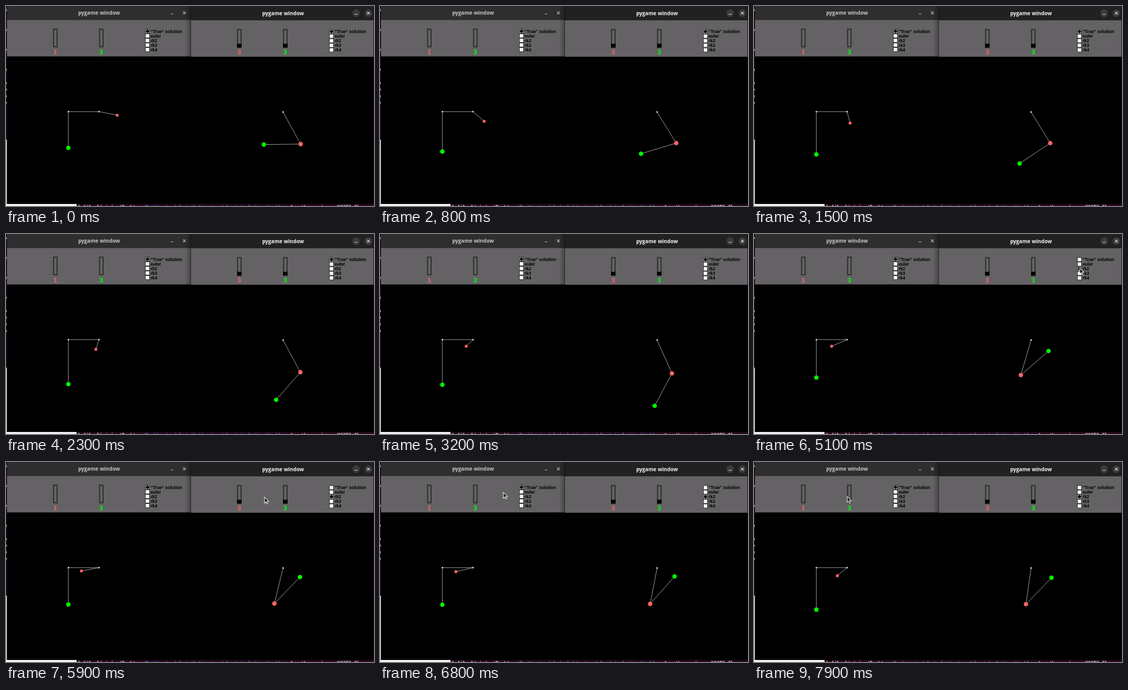
These frames come from a looping animation (720 by 392 pixels, 8000 ms). An HTML page:

```html
<!DOCTYPE html>
<html lang="en">
<head>
<meta charset="utf-8">
<title>Pendulum windows</title>
<style>
  html, body { margin: 0; width: 100%; height: 100%; overflow: hidden; background: #000; }
  svg { display: block; width: 720px; height: 392px; }
  .title { font: 700 10.1px "Open Sans", "Noto Sans", sans-serif; text-anchor: middle; }
  .label { font: 700 8.55px "Liberation Sans", sans-serif; fill: #000; }
  .value { font: 700 13px "Liberation Sans", sans-serif; text-anchor: middle; }
  .term { font: 700 9px "DejaVu Sans Mono", monospace; fill: #d8d4d8; white-space: pre; }
  .path { fill: #4470c4; }
  .rod { stroke: #dcdcdc; stroke-width: .75; fill: none; }
  .red { fill: #ff6464; }
  .green { fill: #00ff00; }
</style>
</head>
<body>
<svg viewBox="0 0 720 392" xmlns="http://www.w3.org/2000/svg">
  <linearGradient id="shade"><stop stop-opacity="0"/><stop offset="1" stop-opacity=".3"/></linearGradient>
  <rect width="720" height="392" fill="#25081d"/>
  <g id="desk"></g>
  <rect x="2" y="0" width="717" height="388" fill="#000"/>
  <g id="left"></g>
  <rect x="350" y="0" width="12" height="99" fill="url(#shade)"/>
  <g id="right"></g>

  <path id="ropes" class="rod"/>
  <circle cx="122" cy="207" r="1.5" fill="#eee"/>
  <circle cx="182" cy="207" r="1.5" fill="#eee"/>
  <circle id="weight" class="green" r="4.3"/>
  <circle id="bob" class="red" r="2.9"/>

  <path id="arms" class="rod"/>
  <circle cx="542.2" cy="207.8" r="1.5" fill="#eee"/>
  <circle id="elbow" class="red" r="4.3"/>
  <circle id="tip" class="green" r="4.3"/>

  <path id="cursor" d="M0 0V11.5L2.7 9L4.5 13L6.5 12.1L4.7 8.2H8.3Z"
        fill="#151515" stroke="#f4f4f4" stroke-width="1.1"/>
</svg>
<script>
const $ = id => document.getElementById(id);
const rect = (x, y, w, h, fill, more = '') =>
  `<rect x="${x}" y="${y}" width="${w}" height="${h}" fill="${fill}" ${more}/>`;
const text = (x, y, cls, s, fill = '') =>
  `<text x="${x}" y="${y}" class="${cls}"${fill && ` fill="${fill}"`}>${s}</text>`;

// Slivers of the desktop around the two windows
function desktop() {
  let s = rect(0, 262, 1.6, 130, '#e9e9e9') + rect(0, 388, 138, 4, '#f1f1f1');
  for (let row = 0; row < 15; row++) {
    if (row % 3 === 0 || row > 10) s += rect(0, 6 + row * 13, 1.4, 4, '#aaa2aa');
  }
  return s + text(140, 397, 'term', '] file list in (Desktop') +
    text(268, 397, 'term path', '/Desktop/models/solution/pendulum/simulation/double') +
    text(556, 397, 'term', '$ python main.py K03T3 Cl');
}
$('desk').innerHTML = desktop();

const options = ['"True" solution', 'euler', 'rk2', 'rk3', 'rk4'];
const optionY = i => 49.4 + i * 9;

function slider(x, y, value, cls, knob) {
  return rect(x + 1.1, y + 1.1, 6.8, 34.3, '#666466', 'stroke="#303030" stroke-width="2.2"') +
    (knob ? rect(x, y + 29, 9, 7.5, '#000') : '') +
    text(x + 4.4, y + 50.2, `value ${cls}`, value);
}

function buildWindow(id, { x, dy, width, bar, ink, masses, active }) {
  const boxX = x + 271;
  const [minX, closeX, y] = active ? [685, 709, 14] : [325, 349, 13.3];
  let s = rect(x, 0, width, 27.3 + dy, bar) + rect(x, 27.3 + dy, width, 71.5, '#646264') +
    text(x + 180, 17.4 + dy * .6, 'title', 'pygame window', ink);
  if (active) {
    for (const cx of [minX, closeX]) s += `<circle cx="${cx}" cy="${y}" r="7.4" fill="#3b3b3b"/>`;
  }
  s += `<path d="M${minX - 2.7} ${y + 2.2}h5.4M${closeX - 2.7} ${y - 2.7}l5.4 5.4m0 -5.4l-5.4 5.4"
    fill="none" stroke="${ink}" stroke-width="1.1"/>`;
  s += slider(x + 90, 44.4 + dy, masses[0], 'red', active) +
    slider(x + 180, 44.4 + dy, masses[1], 'green', active);
  options.forEach((name, i) => {
    const cy = optionY(i) + dy;
    s += rect(boxX - .2, cy - 4, 8, 8, '#f4f4f4', 'stroke="#111" stroke-width=".9"') +
      text(boxX + 10, cy + 3.1, 'label', name);
  });
  s += `<circle class="mark" cx="${boxX + 3.8}" cy="${optionY(0) + dy}" r="3.1"/>`;
  $(id).innerHTML = s;
}
const rightDy = .7;
buildWindow('left', { x: 2, dy: 0, width: 359.5, bar: '#2e2e2e', ink: '#c4c4c4', masses: [1, 3], active: false });
buildWindow('right', { x: 362, dy: rightDy, width: 357, bar: '#212121', ink: '#f4f4f4', masses: [3, 3], active: true });
const mark = document.querySelector('#right .mark');

const LOOP = 8000, STEP = 100;
const stalls = [22, 26, 27, 29, 31, 42, 44];

const poses = [
  [0, 0, 28.7, -89.2, 78.8, 36.2],
  [15, 1.9, 31.6, -56.3, 14.9, 23.3],
  [27, 2.95, 24, -28, -46.1, 18.7],
  [36, 7, -21.7, 106.2, -319.6, 17.7],
  [44, 9.2, -16.3, 131.1, -426.6, 32.7],
  [61, 11, -10.9, 138.4, -436.6, 34.4],
  [72, 12.2, -8, 136.1, -410, 24.8]
];

const pointer = [
  [4400, 631.4, 82], [4800, 637.2, 67], [5300, 637.2, 67],
  [6200, 440, 70], [6800, 241.2, 59.5], [7900, 182.4, 67.7]
];

function span(rows, t) {
  let i = 0;
  while (i < rows.length - 2 && t >= rows[i + 1][0]) i++;
  const u = (t - rows[i][0]) / (rows[i + 1][0] - rows[i][0]);
  return [i, Math.min(1, Math.max(0, u))];
}

function linear(rows, t) {
  const [i, u] = span(rows, t);
  return rows[i].slice(1).map((v, k) => v + (rows[i + 1][k + 1] - v) * u);
}

// Speed of column k at pose i, bent into a parabola at both ends
function speed(i, k) {
  const chord = (a, b) => (poses[b][k] - poses[a][k]) / (poses[b][1] - poses[a][1]);
  const last = poses.length - 1;
  if (i === 0) return 2 * chord(0, 1) - chord(0, 2);
  if (i === last) return 2 * chord(last - 1, last) - chord(last - 2, last);
  return chord(i - 1, i + 1);
}

function poseAt(step) {
  const [i, u] = span(poses, step), a = poses[i], b = poses[i + 1];
  const h = b[1] - a[1], w = 1 - u;
  return [2, 3, 4, 5].map(k =>
    a[k] * w * w * (1 + 2 * u) + b[k] * u * u * (3 - 2 * u) +
    h * u * w * (w * speed(i, k) - u * speed(i + 1, k)));
}

const hang = ([x, y], length, deg) => {
  const a = deg * Math.PI / 180;
  return [x + length * Math.sin(a), y + length * Math.cos(a)];
};
const place = (id, [x, y]) => {
  $(id).setAttribute('cx', x.toFixed(2));
  $(id).setAttribute('cy', y.toFixed(2));
};

function draw(ms) {
  let tick = Math.floor(ms / STEP);
  while (stalls.includes(tick)) tick--;
  const step = tick - stalls.filter(s => s < tick).length;
  const [arm1, arm2, swing, rope] = poseAt(step);

  const bob = hang([182, 207], rope, swing), weight = [122, 314.2 - rope];
  $('ropes').setAttribute('d', `M${weight}L122 207H182L${bob}`);
  place('weight', weight);
  place('bob', bob);

  const pivot = [542.1, 207.9];
  const elbow = hang(pivot, 71.5, arm1), tip = hang(elbow, 72, arm2);
  $('arms').setAttribute('d', `M${pivot}L${elbow}L${tip}`);
  place('elbow', elbow);
  place('tip', tip);

  const now = tick * STEP;
  mark.setAttribute('cy', optionY(now < 4900 ? 0 : 2) + rightDy);
  $('cursor').style.display = now < 4100 ? 'none' : '';
  $('cursor').setAttribute('transform', `translate(${linear(pointer, now)})`);
}

const start = performance.now();
function play() {
  draw((performance.now() - start) % LOOP);
  requestAnimationFrame(play);
}
play();
</script>
</body>
</html>
```
